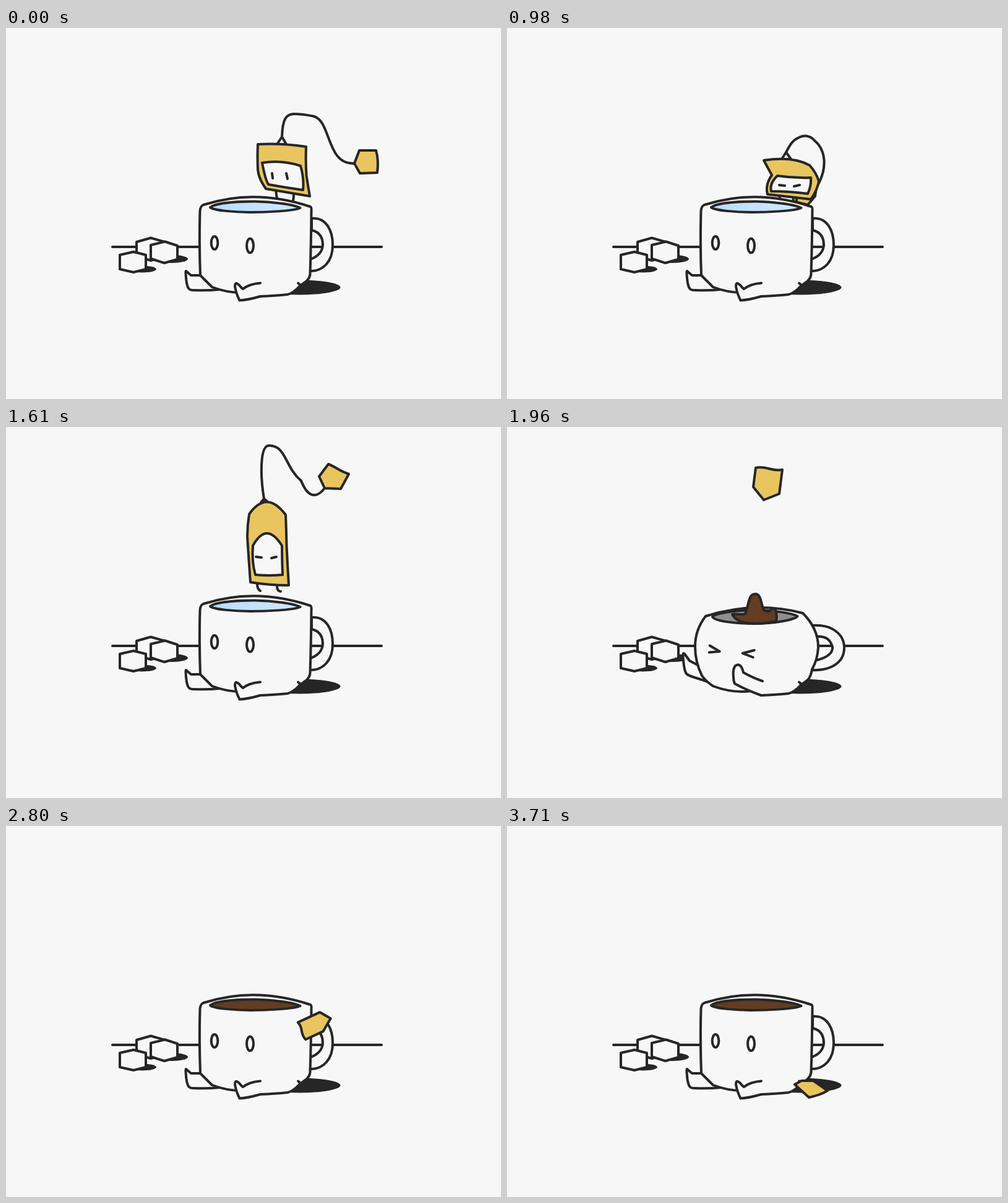
Recreate the animation shown at these times as an HTML page. Size 800 px wide and 600 px high, loop 4.13 s.

```html
<!DOCTYPE html>
<html lang="en">
<head>
<meta charset="utf-8">
<title>Tea dive</title>
<style>
  html, body { margin: 0; width: 100%; height: 100%; overflow: hidden; background: #f7f7f7; }
  svg { display: block; width: 800px; height: 600px; }
  path, ellipse, circle { fill: #f7f7f7; stroke: #262626; stroke-width: 4; stroke-linecap: round; stroke-linejoin: round; }
  .line { fill: none; }
  .shade { fill: #262626; stroke: none; }
  .gold { fill: #e9c55f; }
  .tea { fill: #643c22; }
</style>
</head>
<body>
<svg viewBox="0 0 800 600">
  <defs>
    <linearGradient id="blue"><stop stop-color="#b9dcfb"/><stop offset="1" stop-color="#d0e8ff"/></linearGradient>
    <clipPath id="above"><path id="lip"/></clipPath>
  </defs>
  <path class="line" d="M172 354H607"/>
  <path d="M211 346L234 339.5L257 346V370L234 376L211 369Z"/>
  <ellipse class="shade" cx="268" cy="373.5" rx="26" ry="6.5"/>
  <path d="M234 351L257 345.5L277 352V374L256 380L234 373Z"/>
  <ellipse class="shade" cx="220" cy="390" rx="23" ry="5.5"/>
  <path d="M184 367L206 362L226 367V390L206 395L184 390Z"/>
  <ellipse class="shade" cx="475" cy="419.5" rx="65.5" ry="12"/>
  <g id="bag">
    <path id="tag" class="gold"/>
    <g id="doll">
      <path id="string" class="line"/>
      <path id="legs" class="line"/>
      <path id="hook"/>
      <path id="body" class="gold"/>
      <path id="face"/>
      <path id="eyes" class="line"/>
    </g>
  </g>
  <g id="cup">
    <path id="handle"/>
    <path id="footL"/>
    <path id="mug"/>
    <path id="footR"/>
    <path class="line" d="M472 412.5L477 417"/>
    <path id="water"/>
    <g id="look">
      <g id="open">
        <ellipse cx="337" cy="347.5" rx="5.3" ry="10.5"/>
        <ellipse cx="394.5" cy="352" rx="5.5" ry="11.5"/>
      </g>
      <path id="shut" class="line" d="M329 343L345 352.5L328 354M401 350.5L382 355.5L399 362"/>
    </g>
    <path id="splash" class="tea"/>
    <g clip-path="url(#above)"><circle id="drop" class="tea" r="10"/></g>
  </g>
</svg>
<script>
const LOOP = 4130, STEP = 70;
const el = id => document.getElementById(id);
const draw = (id, d) => el(id).setAttribute('d', d);
const show = (id, on) => el(id).style.display = on ? '' : 'none';

// Blend two paths with the same commands, or two objects of paths.
function mix(a, b, k) {
  if (typeof a === 'number') return a + (b - a) * k;
  if (typeof a === 'object')
    return Object.fromEntries(Object.keys(a).map(key => [key, mix(a[key], b[key], k)]));
  const to = b.match(/-?[\d.]+/g);
  let i = 0;
  return a.replace(/-?[\d.]+/g, n => (+n + (to[i++] - n) * k).toFixed(2));
}

// Value of a track of [time, value] keys.
function at(keys, t) {
  const next = keys.findIndex(key => key[0] > t);
  if (next < 0) return keys[keys.length - 1][1];
  if (next === 0) return keys[0][1];
  const [t0, a] = keys[next - 1], [t1, b] = keys[next];
  return mix(a, b, (t - t0) / (t1 - t0));
}

const mapXY = (d, fn) => d.replace(/(-?[\d.]+) (-?[\d.]+)/g,
  (_, x, y) => fn(+x, +y).map(n => n.toFixed(2)).join(' '));
const shift = (d, dx, dy) => typeof d === 'string'
  ? mapXY(d, (x, y) => [x + dx, y + dy])
  : Object.fromEntries(Object.entries(d).map(([key, v]) => [key, shift(v, dx, dy)]));
const first = d => d.match(/-?[\d.]+ -?[\d.]+/)[0];

// Cup, upright and squashed
const mug = [
  'M333 419Q322 408 314 400Q312 345 313.5 296Q314 288 319 286Q403 259 492 289Q494 290 493.5 296Q493 350 491.5 398Q491 404 486 409L475 417Q464 429 455 431Q435 433 411 434L394 427Q365 431 333 419Z',
  'M333 419Q321 411 315 402Q304 380 304 355Q304 328 321 306Q400 281 478 301Q503 326 503 356Q502 376 493 392Q491 404 486 409L475 417Q464 429 455 431Q435 433 411 434L394 427Q365 431 333 419Z'];
const handle = [
  'M494 308C518 306 528 328 528 351C528 376 514 394 490 393L492 374Q511 367 512 351Q512 331 494 327Z',
  'M494 321C525 319 545 335 545 357C545 380 525 395 490 393L497 378Q527 371 526 356Q521 337 500 339Z'];
const back = ['M330 290C340 282 380 280.5 402 280.5C430 281 465 285 475.5 291',
  'M332 307C338 300 380 296 400 296C430 296 460 301 469.5 306'];
const front = ['C465 296 420 298 395 298C370 298 335 295 330 290',
  'C465 312 430 318 400 318C370 318 335 314 332 307'];
const squash = [[0, 0], [280, .3], [490, .42], [630, .4], [840, 0], [1680, 0], [1750, .3],
  [1820, .8], [1890, 1], [1960, 1], [2100, .45], [2240, -.1], [2380, 0]];

const footR = {
  rest: 'M411 412.5Q393 414 383 422Q380 420 377 416Q370 409 370 418Q372 430 377.5 440.5Q390 440 411 434',
  kick: 'M413 411Q398 406 382 397Q379 384 373 384.5Q364 386 366 405Q366.5 412 368 415Q388 426 411 434',
  sway: 'M411 412.5Q391 413 381 421Q378 419 375 414Q368 408 368.5 418Q370 432 380 442Q392 440 411 434'
};
const footL = {
  rest: 'M316 400L299 400L292 394Q290 391 290.5 398Q291.5 416 295 421Q297 424 303 424Q325 425 345 423',
  kick: 'M312 387L295 378L287 367Q284 364 284.5 371Q286 394 290 399Q293 402 303 405Q316 409 327 413',
  sway: 'M316 402L299 403L291 394Q288 391 289 399Q291 416 295 422Q297 425 303 425.5Q325 427 347 424'
};
const kicks = foot => [[1680, foot.rest], [1890, foot.kick], [2030, foot.kick],
  [2240, foot.sway], [2380, foot.sway], [2590, foot.rest]];
const kicksL = kicks(footL), kicksR = kicks(footR);

// Tea bag poses; the string lacks both of its ends
const stand = {
  body: 'M407 188Q446 186 485 192Q484 215 485.5 238Q488 255 491 272Q455 266 420 260Q408 243 407 229Q406 208 407 188Z',
  face: 'M414 218Q446 213 476 223Q482 243 480 262Q452 258 424 253Q419 245 414 218Z',
  eyes: 'M430 235L431 243M453 235L455 244',
  legs: 'M436 262Q437 270 438 276M465 268Q465 274 464 280',
  hook: 'M446 176L438 188L453 188Z',
  string: 'C447 148 452 139 466 139C480 139 488 141 496 142.5C526 148 517 222'
};
const crouch = {
  body: 'M415 214Q462 207 489 222Q500 234 504 248Q501 263 491 277Q455 273 421 269Q417 253 428 238Q422 227 415 214Z',
  face: 'M437 239Q464 243 491 242Q492 256 486 268Q456 264 427 264Q424 251 437 239Z',
  eyes: 'M440 254L449 255M464 256L473 254',
  legs: 'M440 268Q441 274 441 280M468 272Q468 278 468 284',
  hook: 'M451 201L444 212L459 212Z',
  string: 'C457 190 461 182 470 178C480 172 490 174 497 182C514 196 520 225'
};
const dive = {
  body: 'M393 141Q421 101 452 142Q453 167 453.5 192Q455 224 457 256Q425 256 395 251Q391 195 390 177Q390 159 393 141Z',
  face: 'M399 192Q421 152 446 192Q446 215 447 239Q425 241 403 239Q397 218 399 192Z',
  eyes: 'M404 210L413 211M429 212L437 210',
  legs: 'M406 254Q406 262 411 265M438 258Q438 265 444 266',
  hook: 'M417 116L412 122L423 121Z',
  string: 'C411 80 410 30 425 30C453 30 450 64 477 87C486 110 499 119'
};
const apex = { ...shift(dive, 6, -58),
  string: 'C428 46 448 46 462 70C475 96 476 125 498 138C515 148 526 146' };
const fall = { ...shift(dive, 4, -30), string: shift(dive.string, 2, -12) };
const low = mix(stand, crouch, .9);
const doll = [[0, stand], [420, shift(stand, 3, 9)], [840, low], [910, low], [980, crouch],
  [1120, shift(crouch, -3, 4)], [1260, mix(crouch, apex, .6)], [1400, apex], [1470, apex],
  [1540, fall], [1610, dive], [1680, shift(dive, -10, 75)], [1750, shift(dive, -18, 150)],
  [1820, shift(dive, -18, 195)]];

// Paper tag, its string corner first
function tagAt(x, y, deg, w = 1) {
  const c = Math.cos(deg * Math.PI / 180), s = Math.sin(deg * Math.PI / 180);
  return mapXY('M-3 25L-20 4L-16 -27C2 -31 10 -20 27 -24L22 15Z',
    (u, v) => [x + u * w * c - v * s, y + u * w * s + v * c]);
}
const diveTag = 'M515 99L506 80L521 60C532 64 540 72 554 76L541 100Z';
const tucked = 'M500 258L498 272L486 286C478 284 470 282 462 280L466 262Z';
const flat = 'M476 412L495 412L518 428C510 433 502 436 488 439L465 418Z';
const tag = [
  [0, 'M563 219L571 198L598 198C601 208 602 218 600 234L572 235Z'],
  [210, tagAt(558, 244, 115)], [420, tagAt(505, 250, 155, .9)], [840, tucked], [980, tucked],
  [1120, tagAt(520, 282, 170, .8)], [1260, tagAt(600, 200, 110)], [1400, tagAt(552, 132, 80)],
  [1470, tagAt(552, 132, 80)], [1540, tagAt(545, 105, 55)], [1610, diveTag],
  [1750, tagAt(480, 58, 15)], [1960, tagAt(418, 93, 0)], [2030, tagAt(426, 174, -8, .8)],
  [2240, tagAt(452, 222, -22, .6)],
  [2380, 'M514 275L495 263L475 236C482 230 488 229 495 228L512 252Z'],
  [2520, tagAt(535, 256, -70, .7)], [2590, tagAt(527, 264, -85, .7)],
  [2800, tagAt(502, 322, -120, .7)], [3010, tagAt(508, 383, -160, .7)],
  [3220, 'M482 404L496 411L509 430C497 428 485 427 473 426L468 407Z'],
  [3500, shift(flat, 7, -1)], [3710, flat]];

const crown = 'M364 303C368 301 378 305 385 302C391 288 390 270 401 270C411 270 410 285 415 296Q422 300 425 297Q430 290 434 296Q437 306 435 314C415 319 390 319 378 315Q367 310 364 303Z';
const spread = (w, h) => mapXY(crown, (x, y) => [400 + (x - 400) * w, 317 + (y - 317) * h]);
const splash = [[1820, spread(.8, .35)], [1890, spread(.9, .8)], [1960, crown],
  [2030, spread(1.25, .9)], [2100, spread(1.4, .4)]];
const dropY = [[2030, 262], [2170, 205], [2240, 202], [2310, 214], [2380, 239], [2520, 310]];

function render(t) {
  const s = at(squash, t), bend = pair => mix(pair[0], pair[1], s);
  const rim = bend(back), lip = bend(front);
  draw('mug', bend(mug));
  draw('handle', bend(handle));
  draw('footL', at(kicksL, t));
  draw('footR', at(kicksR, t));
  draw('water', rim + lip + 'Z');
  draw('lip', `M0 0L800 0L800 290L${rim.match(/\S+ \S+$/)[0]}${lip}L0 290Z`);
  el('water').style.fill = t < 1820 ? 'url(#blue)' : t < 2100 ? '#8f8f8f' : '#643c22';

  const squint = t >= 1750 && t < 2660;
  show('open', !squint);
  show('shut', squint);
  el('look').setAttribute('transform', `translate(${-1.3 * s} ${10.5 * s})`);

  const pose = at(doll, t), paper = at(tag, t);
  for (const id of ['body', 'face', 'eyes', 'legs', 'hook']) draw(id, pose[id]);
  draw('tag', paper);
  draw('string', `M${first(pose.hook)}${pose.string} ${first(paper)}`);
  show('doll', t < 1890);

  const over = t >= 1540;
  if (over) el('cup').after(el('bag'));
  else el('cup').before(el('bag'));
  el('doll').setAttribute('clip-path', over ? 'url(#above)' : 'none');

  show('splash', t >= 1820 && t < 2100);
  draw('splash', at(splash, t));
  show('drop', t >= 2030 && t < 2520);
  el('drop').setAttribute('cx', at([[2030, 401], [2380, 407]], t));
  el('drop').setAttribute('cy', at(dropY, t));
}

const start = performance.now();
function tick() {
  const t = (performance.now() - start) % LOOP;
  render(Math.floor(t / STEP) * STEP);
  requestAnimationFrame(tick);
}
tick();
</script>
</body>
</html>
```
